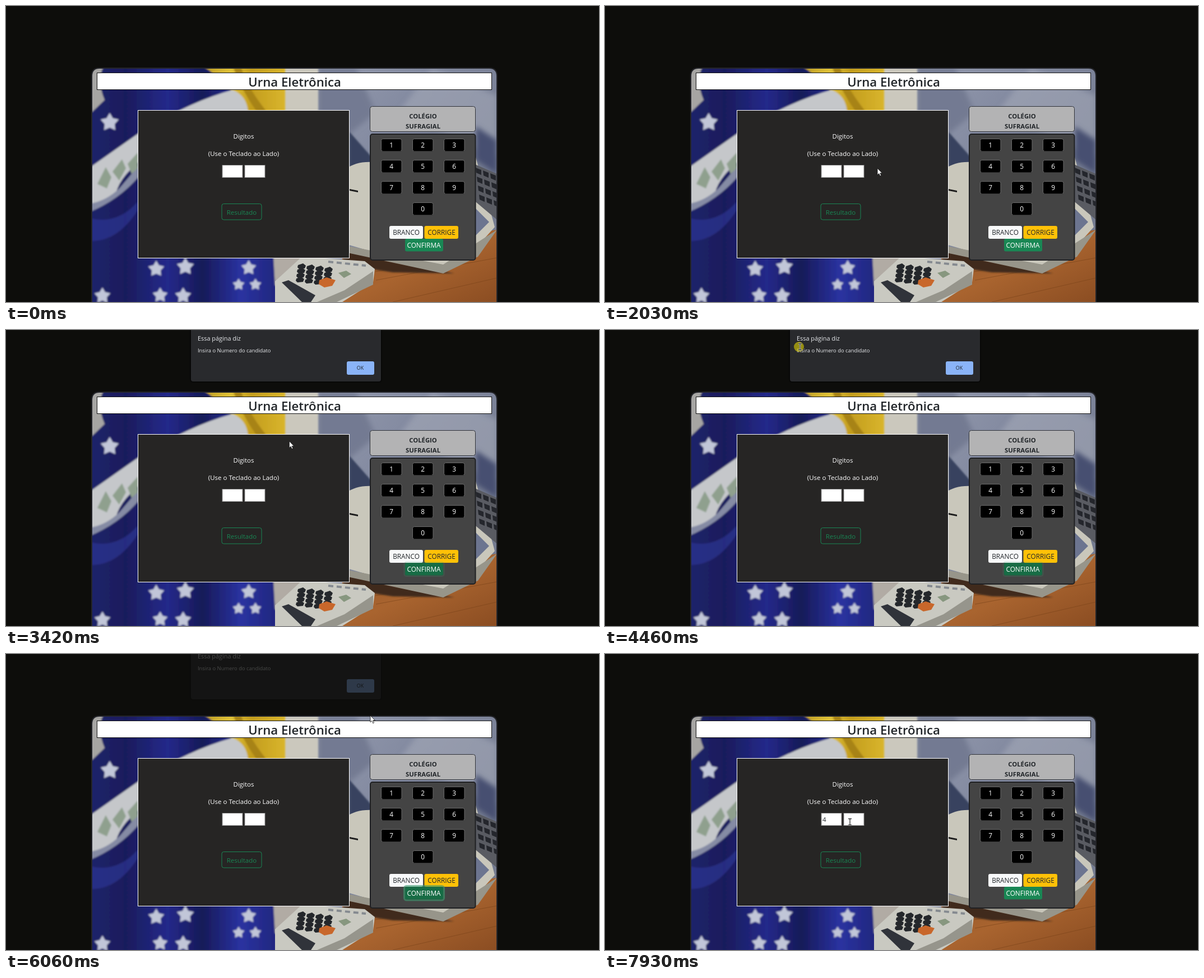
Write an HTML page that moves like this. It is 1058 px wide and 529 px high and loops after 8 s.

```html
<!DOCTYPE html>
<html lang="pt-BR">
<head>
<meta charset="utf-8">
<title>Urna Eletrônica</title>
<style>
  html, body { margin: 0; width: 100%; height: 100%; overflow: hidden; background: #0d0d0b; }
  svg { display: block; width: 1058px; height: 529px; }
  text { font: 11.5px "Open Sans", "Noto Sans", sans-serif; fill: #fff; }
  .mid { text-anchor: middle; }
  .caps { font-size: 11.8px; }
  .ink { fill: #212529; }
  .soft { filter: url(#blur2); }
  .haze { filter: url(#blur5); }
</style>
</head>
<body>
<svg viewBox="0 0 1058 529">
  <defs>
    <filter id="blur2"><feGaussianBlur stdDeviation="1.6"/></filter>
    <filter id="blur5"><feGaussianBlur stdDeviation="5"/></filter>
    <clipPath id="panel"><rect x="153" y="111" width="723" height="440" rx="14"/></clipPath>
    <linearGradient id="navy">
      <stop offset="0" stop-color="#20246c"/><stop offset=".2" stop-color="#191c5c"/>
      <stop offset=".42" stop-color="#24298a"/><stop offset=".6" stop-color="#161a58"/>
      <stop offset=".8" stop-color="#2a32a0"/><stop offset="1" stop-color="#20267c"/>
    </linearGradient>
    <linearGradient id="gold">
      <stop offset="0" stop-color="#b99722"/><stop offset=".35" stop-color="#e0c238"/>
      <stop offset=".6" stop-color="#c39d1e"/><stop offset="1" stop-color="#d9b52c"/>
    </linearGradient>
    <linearGradient id="cloth" x2="1" y2=".4">
      <stop offset="0" stop-color="#7c839a"/><stop offset=".4" stop-color="#9aa0b2"/>
      <stop offset=".7" stop-color="#858ca2"/><stop offset="1" stop-color="#747b90"/>
    </linearGradient>
    <linearGradient id="wood" x2="1" y2="1">
      <stop offset="0" stop-color="#8a5128"/><stop offset=".5" stop-color="#a9642f"/><stop offset="1" stop-color="#8b4d22"/>
    </linearGradient>
  </defs>

  <g clip-path="url(#panel)">
    <rect x="153" y="111" width="723" height="418" fill="url(#cloth)"/>
    <path d="M556 111H625L660 190L600 240H556Z" fill="#737a92" class="haze"/>
    <path d="M760 111L876 160V270L700 190Z" fill="#a3a8b7" opacity=".6" class="haze"/>
    <path d="M613 225L670 290H613Z" fill="#39425e" class="soft"/>
    <path d="M838 215L876 240V300L838 275Z" fill="#465071" class="haze"/>
    <path d="M490 111H557V200H490Z" fill="#cbc8bd" class="soft"/>
    <path d="M600 440L876 400V529H600Z" fill="url(#wood)"/>
    <path d="M660 490L876 450M690 529L876 486M640 478L700 468" stroke="#784219" opacity=".6"/>
    <path d="M605 430L680 455L800 478L690 476L600 462Z" fill="#3f2b1e" class="soft"/>
    <path d="M605 292Q625 277 655 279L838 270L872 395L845 425L780 476L605 425Z" fill="#c9c7bb"/>
    <path d="M605 428L780 462L845 420L876 400L842 448L780 478L605 440Z" fill="#97958a"/>
    <path d="M613 327L628 330V333L613 330Z" fill="#1c1c1c"/>
    <path d="M830 280L876 300V382L838 350Z" fill="#595b62"/>
    <g id="sideKeys" fill="#24262c"></g>
    <path d="M836 360L862 386L838 410Z" fill="#6c7590"/>

    <g class="soft">
      <path d="M145 105H360Q410 150 432 190L480 400L487 540H145Z" fill="url(#navy)"/>
      <path d="M145 105H176Q160 130 176 168L153 190Z" fill="#a6a5a3"/>
      <path d="M348 105H498V195H434Q402 140 348 105Z" fill="url(#gold)"/>
      <path d="M406 111Q420 150 448 190H466Q430 145 420 111Z" fill="#a78314"/>
      <path d="M145 292Q190 260 240 225Q330 170 404 150Q430 160 432 190L250 270Q205 300 196 335Q172 352 145 354Z" fill="#c5c7ca"/>
      <path d="M145 354Q178 350 203 325L236 286V306Q200 348 145 370Z" fill="#858ba4"/>
      <path d="M163 318L178 288L188 306L180 326ZM190 296L207 274L214 290L202 312ZM217 282L235 262V290L224 300Z" fill="#8fa08e"/>
      <path d="M153 380Q200 390 235 350V365Q200 420 153 420Z" fill="#303899" opacity=".6"/>
      <g id="stars" fill="#c1c6d8"></g>
      <path d="M477 445H560L510 475L480 500Z" fill="#b1aba4"/>
    </g>

    <path d="M480 492L528 448L640 456L658 470L655 494L600 529H480Z" fill="#c9c9c1"/>
    <path d="M655 474V498L590 529H555L604 508Z" fill="#96958c"/>
    <path d="M492 494L504 490L552 517L544 529H528Z" fill="#30333a"/>
    <g id="deskKeys" fill="#24272b"></g>
    <path d="M559 490L572 485L588 490L582 500L568 503L558 497Z" fill="#c8672b"/>
    <path d="M593 477L607 473L616 479L603 486Z" fill="#87977f"/>
    <path d="M575 457L642 464" stroke="#858a90" stroke-width="4" stroke-dasharray="9 6"/>
  </g>
  <path d="M153 529V125Q153 111 167 111H862Q876 111 876 125V529" fill="none" stroke="#24252a" stroke-width="2"/>

  <rect x="162.500" y="119.500" width="704" height="30" fill="#fff" stroke="#111"/>
  <text x="515" y="144" class="mid ink" style="font-size:22.2px;font-weight:600">Urna Eletrônica</text>

  <rect x="235.500" y="186.500" width="377" height="264" fill="#262524" stroke="#fff"/>
  <text x="424" y="237" class="mid">Digitos</text>
  <text x="424" y="267.500" class="mid">(Use o Teclado ao Lado)</text>
  <g fill="#fff" stroke="#858585">
    <rect x="386" y="284.500" width="36" height="22"/>
    <rect x="426" y="284.500" width="36" height="22"/>
  </g>
  <text id="digit" x="388" y="300" class="ink">4</text>
  <rect x="385" y="353.500" width="71" height="28.500" rx="3.500" fill="none" stroke="#198754"/>
  <text x="420.500" y="372.500" class="mid" style="fill:#198754">Resultado</text>

  <rect x="649.500" y="179.500" width="188" height="45" rx="4" fill="#b3b3b4" stroke="#30333a"/>
  <g style="font-weight:700">
    <text x="744" y="201" class="mid ink" style="font-weight:700;font-size:11.300px">COLÉGIO</text>
    <text x="744" y="219" class="mid ink" style="font-weight:700;font-size:11.300px">SUFRAGIAL</text>
  </g>
  <rect x="650" y="229" width="187.500" height="225" rx="4" fill="#444" stroke="#1f2023" stroke-width="2"/>
  <g id="keys"></g>
  <rect x="684" y="393" width="60" height="23" rx="3" fill="#f8f9fa"/>
  <text x="714" y="409" class="mid caps ink">BRANCO</text>
  <rect x="746.500" y="393" width="60.500" height="23" rx="3" fill="#ffc107"/>
  <text x="777" y="409" class="mid caps ink">CORRIGE</text>
  <rect id="ring" x="710.500" y="414.500" width="71" height="25.500" rx="4" fill="none" stroke="#3c996e" stroke-width="3"/>
  <rect id="confirm" x="712" y="416" width="68" height="22.500" rx="3"/>
  <text x="745.500" y="431.500" class="mid caps">CONFIRMA</text>

  <g id="dialog">
    <rect x="328" y="-20" width="343" height="114" rx="5" fill="#000" opacity=".35"/>
    <rect x="330" y="-20" width="339" height="112" rx="4" fill="#292a2d"/>
    <text x="342" y="19" style="font-size:10.900px;fill:#e8eaed">Essa página diz</text>
    <text x="342" y="40" style="font-size:9.400px;fill:#e8eaed">Insira o Numero do candidato</text>
    <rect x="608" y="56" width="49" height="24" rx="3" fill="#8ab4f8"/>
    <text x="632" y="71" class="mid ink" style="font-size:8.800px">OK</text>
  </g>

  <g id="cursor">
    <circle id="press" cx="-2" r="9" fill="#e6d700" opacity=".58"/>
    <path id="arrow" d="M0 0V12L2.800 9.400L4.700 13.800L6.700 12.900L4.800 8.700H8.500Z" fill="#fff" stroke="#111" stroke-width=".8"/>
    <path id="hand" d="M-1.500 8V.8Q0 -1 1.500 .8V6Q3 4.800 4 6.300Q5.500 5.500 6.200 7Q8 6.800 8 9V12L6.500 16.500H-1L-4.500 11Q-5 9 -3 9Z" fill="#fff" stroke="#111" stroke-width=".9"/>
    <g id="beam" fill="none">
      <path d="M-3 -5.500H3M0 -5.500V5.500M-3 5.500H3" stroke="#d5d5d5" stroke-width="2.400"/>
      <path d="M-3 -5.500H3M0 -5.500V5.500M-3 5.500H3" stroke="#1c1c1c"/>
    </g>
  </g>
</svg>
<script>
const LOOP = 8000;
const $ = id => document.getElementById(id);
const clamp = v => Math.max(0, Math.min(1, v));
const within = (t, a, b) => t >= a && t < b;

// Keypad
$('keys').innerHTML = [1, 2, 3, 4, 5, 6, 7, 8, 9, 0].map((n, i) => {
  const x = 669 + 56 * (n ? i % 3 : 1), y = 237 + 38 * Math.floor(i / 3);
  return `<rect x="${x + .5}" y="${y + .5}" width="36.500" height="22" rx="3" fill="#000" stroke="#6b6b6b"/>
    <path d="M${x + 2} ${y + 22.5}H${x + 36}" stroke="#303030"/>
    <text x="${x + 18.5}" y="${y + 16}" class="mid caps">${n}</text>`;
}).join('');

// Backdrop details
const starPath = (x, y, r) => 'M' + Array.from({ length: 10 }, (_, i) => {
  const a = i * Math.PI / 5 - Math.PI / 2, k = i % 2 ? r * .55 : r;
  return `${(x + k * Math.cos(a)).toFixed(1)} ${(y + k * Math.sin(a)).toFixed(1)}`;
}).join('L') + 'Z';
$('stars').innerHTML = [
  [185, 208, 17], [268, 470, 15], [320, 466, 16], [433, 468, 14], [172, 518, 15],
  [275, 517, 14], [316, 518, 15], [415, 498, 11], [445, 498, 11]
].map(s => `<path d="${starPath(...s)}"/>`).join('');

const grid = (cols, rows, place, shape) => Array.from({ length: cols * rows }, (_, i) => {
  const [x, y] = place(i % cols, Math.floor(i / cols));
  return `<path transform="translate(${x} ${y})" d="${shape}"/>`;
}).join('');
$('deskKeys').innerHTML = grid(4, 4, (c, r) => [521 + c * 16 - r * 4 + r * 3, 463 + c * 2 + r * 8], 'M0 0L9 -3L14 1L12 6L2 7L-1 4Z');
$('sideKeys').innerHTML = grid(3, 4, (c, r) => [838 + c * 13 + r * 2, 289 + c * 5 + r * 16], 'M0 0L10 4V13L1 9Z');

// Bursts of movement: start, end, number of steps
const bursts = [
  [240, 520, 5], [720, 930, 4], [1130, 1890, 11], [1960, 2740, 12], [2810, 2810, 1],
  [3080, 3840, 12], [3910, 4190, 5], [4460, 5210, 10], [5280, 6060, 12],
  [6130, 6890, 12], [6960, 7240, 5], [7440, 7930, 8]
];

function stepTime(t) {
  const burst = bursts.filter(b => b[0] <= t).pop();
  if (!burst) return 0;
  const [start, end, n] = burst;
  const gap = (end - start) / (n - 1) || 70;
  return Math.min(end, start + Math.floor((t - start) / gap + .2) * gap);
}

// Pointer path: time, x, y, shape taken from that time on
const path = [
  [240, 960, 515, 'arrow'], [520, 407, 110, 'arrow'], [720, 405, 112, 'arrow'], [930, 407, 143, 'arrow'],
  [1130, 408, 132, 'arrow'], [1206, 408, 119, 'arrow'], [1510, 738, 419, 'hand'], [1660, 744, 421, 'arrow'],
  [1890, 540, 330, 'arrow'], [2031, 486, 290, 'arrow'], [2240, 419, 222, 'arrow'], [2320, 430, 240, 'arrow'],
  [2600, 735, 424, 'hand'], [2740, 742, 429, 'hand'], [2810, 746, 431, 'hand'], [3080, 745, 431, 'hand'],
  [3149, 713, 403, 'hand'], [3210, 670, 370, 'arrow'], [3600, 372, 60, 'arrow'], [3840, 372, 47, 'arrow'],
  [3910, 370, 45, 'arrow'], [4050, 352, 33, 'beam'], [4190, 348, 30, 'beam'], [4590, 348, 30, 'beam'],
  [4700, 440, 42, 'arrow'], [5040, 649, 67, 'arrow'], [5210, 638, 67, 'arrow'], [5490, 607, 72, 'arrow'],
  [5700, 628, 68, 'arrow'], [5920, 630, 68, 'arrow'], [6060, 650, 110, 'arrow'], [6200, 762, 415, 'hand'],
  [6290, 735, 400, 'arrow'], [6440, 470, 305, 'beam'], [6475, 424, 296, 'beam'], [6620, 412, 296, 'beam'],
  [6680, 470, 298, 'arrow'], [6860, 676, 309, 'hand'], [6960, 683, 308, 'hand'], [7240, 674, 281, 'hand'],
  [7570, 674, 281, 'hand'], [7650, 600, 290, 'arrow'], [7800, 445, 299, 'beam'], [7930, 437, 300, 'beam']
];

function pointerAt(t) {
  let i = path.length - 1;
  while (i > 0 && path[i][0] > t) i--;
  const a = path[i], b = path[i + 1] || a;
  const p = clamp((t - a[0]) / (b[0] - a[0] || 1));
  return [a[1] + (b[1] - a[1]) * p, a[2] + (b[2] - a[2]) * p, a[3]];
}

function draw() {
  const t = stepTime(performance.now() % LOOP);
  const [x, y, shape] = pointerAt(t);
  $('cursor').style.display = t < 240 ? 'none' : '';
  $('cursor').setAttribute('transform', `translate(${x.toFixed(2)} ${y.toFixed(2)})`);
  for (const id of ['arrow', 'hand', 'beam']) $(id).style.display = id === shape ? '' : 'none';
  const pressed = within(t, 3080, 3140) || within(t, 4460, 4580) || within(t, 5840, 5930) || within(t, 7440, 7540);
  $('press').style.display = pressed ? '' : 'none';

  const shown = clamp((t - 3125) / 190) * (1 - clamp((t - 5920) / 190));
  $('dialog').setAttribute('opacity', shown.toFixed(3));
  $('dialog').setAttribute('transform', `translate(0 ${(-15 * (1 - shown)).toFixed(2)})`);

  const focused = within(t, 3080, 7500);
  const hovered = within(t, 1510, 1700) || within(t, 2600, 3080);
  $('confirm').setAttribute('fill', focused ? '#176c45' : hovered ? '#157347' : '#198754');
  $('ring').setAttribute('opacity', focused ? (t < 5950 ? .2 : .62) : 0);
  $('ring').setAttribute('stroke-width', t < 5950 ? 2 : 3);
  $('digit').style.display = t >= 7500 ? '' : 'none';
  requestAnimationFrame(draw);
}
draw();
</script>
</body>
</html>
```
